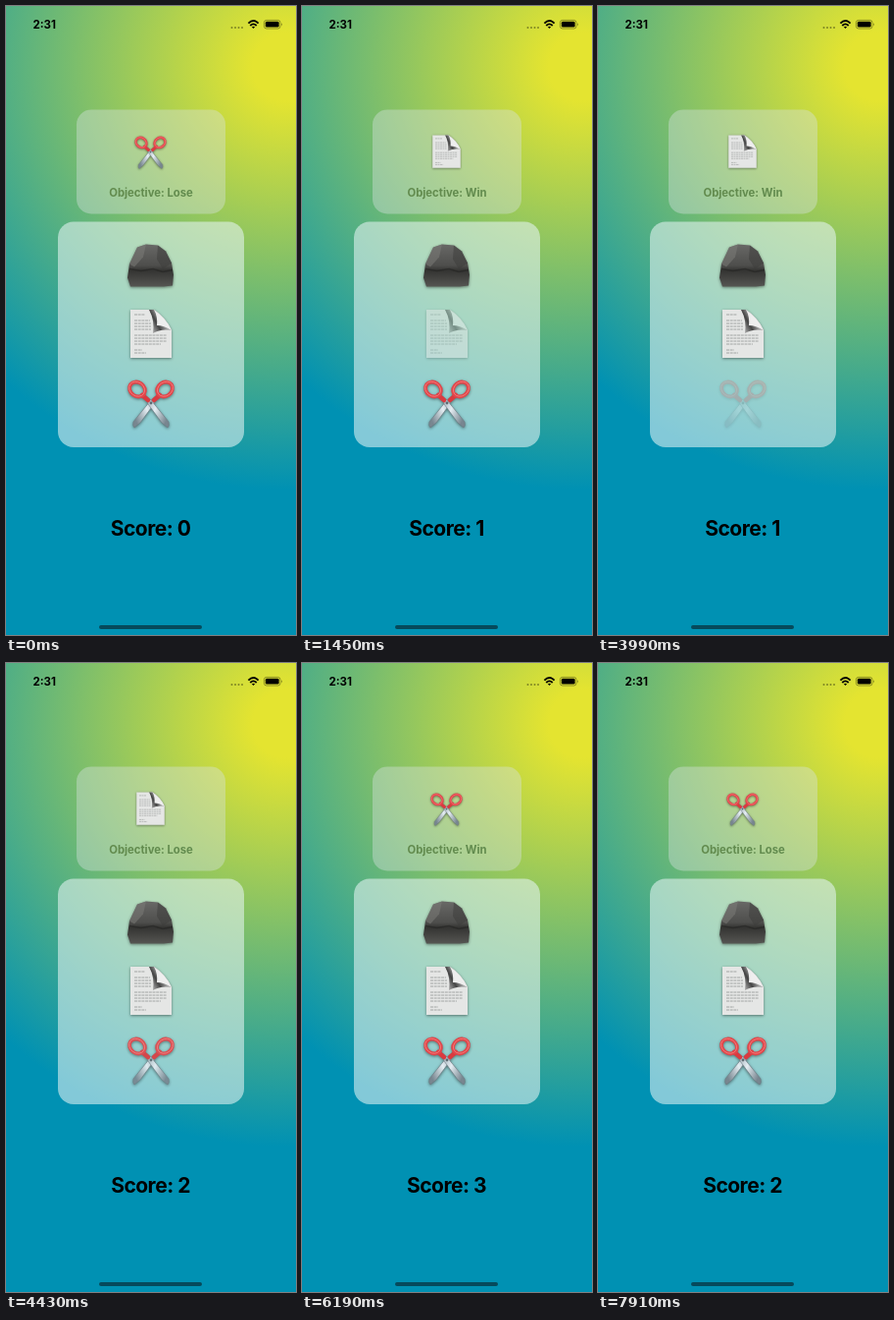
Recreate the animation shown at these times as an HTML page. Size 296x640 px, loop 8 s.

```html
<!DOCTYPE html>
<html lang="en">
<head>
<meta charset="utf-8">
<style>
  html, body { margin: 0; width: 100%; height: 100%; overflow: hidden; }
  svg { display: block; width: 100vw; height: 100vh; }
  text { font-family: Inter, Roboto, sans-serif; font-weight: 700; }
  .mid { text-anchor: middle; }
  .icon { filter: drop-shadow(0 1px 1.5px rgba(0, 0, 0, .45)); }
</style>
</head>
<body>
<svg viewBox="0 0 296 640">
  <defs>
    <radialGradient id="sky" gradientUnits="userSpaceOnUse" cx="286" cy="62" r="430">
      <stop offset=".08" stop-color="#e4e430"/>
      <stop offset="1" stop-color="#0091b3"/>
    </radialGradient>
    <linearGradient id="stone" x2="0" y2="1">
      <stop offset="0" stop-color="#686866"/>
      <stop offset=".5" stop-color="#4e4e4c"/>
      <stop offset=".62" stop-color="#343432"/>
      <stop offset="1" stop-color="#555552"/>
    </linearGradient>
    <linearGradient id="curl" x1="0" y1=".8" x2="1" y2=".2">
      <stop offset="0" stop-color="#bbb"/>
      <stop offset=".35" stop-color="#444"/>
      <stop offset=".6" stop-color="#aaa"/>
      <stop offset="1" stop-color="#f4f4f4"/>
    </linearGradient>
    <linearGradient id="steel" x2="1" y2=".6">
      <stop offset="0" stop-color="#8d9ca6"/>
      <stop offset=".5" stop-color="#e4edf2"/>
      <stop offset="1" stop-color="#788690"/>
    </linearGradient>

    <g id="rock">
      <path d="M-14-19L-5-22 7-21 15-15 21-3 23 9 22 20 13 21-21 21-24 12-22-2z" fill="url(#stone)"/>
      <path d="M-14-19L-5-22-8-9-17 1-22-2z" fill="#7d7d7a" opacity=".5"/>
      <path d="M7-21L15-15 21-3 12 3 6-7z" fill="#3c3c3a" opacity=".5"/>
      <path d="M-22 3L-10 5 2 3 12 6 22 4" fill="none" stroke="#242422" stroke-width="1.5" opacity=".6"/>
    </g>

    <g id="paper">
      <path d="M-21-25H3Q15-17 21-4V24H-21z" fill="#e5e6e5"/>
      <path d="M-17-20H-6M-17-14H-1M-17-11H0M-17-8H0M-17-5H0M-17 1H16M-17 4H16M-17 7H16M-17 10H10M-17 16H-9M-17 19H-5"
            stroke="#a2a5a4" stroke-width="1" stroke-dasharray="3 .7"/>
      <path d="M-2-25H3Q15-17 21-4Q10-6 2-1Q4-14-2-25z" fill="url(#curl)"/>
      <path d="M3-25Q7-18 6-9Q13-9 21-4Q15-17 3-25z" fill="#eee"/>
    </g>

    <g id="half">
      <path d="M-6-8L0-3 18 19Q19 23 17 25L11 20-3 1z" fill="url(#steel)" stroke="#6c7a82" stroke-width=".6"/>
      <path d="M-9-8L-3-3" stroke="#d93b40" stroke-width="4.5" stroke-linecap="round"/>
      <ellipse cx="-14" cy="-14" rx="7" ry="8.4" transform="rotate(-55 -14 -14)"
               fill="none" stroke="#e2454a" stroke-width="3.8"/>
      <ellipse cx="-14" cy="-14.5" rx="7" ry="8.4" transform="rotate(-55 -14 -14)"
               fill="none" stroke="#f58a86" stroke-width=".7"/>
    </g>
    <g id="scissors">
      <use href="#half" transform="scale(-1 1)"/>
      <use href="#half"/>
      <circle cy="0" r="1.4" fill="#5d6970"/>
    </g>
  </defs>

  <rect width="296" height="640" fill="url(#sky)"/>

  <text x="27.5" y="23" font-size="11.5" font-weight="600">2:31</text>
  <g fill="#000" fill-opacity=".4">
    <circle cx="230.5" cy="22" r="1"/><circle cx="234" cy="22" r="1"/>
    <circle cx="237.5" cy="22" r="1"/><circle cx="241" cy="22" r="1"/>
  </g>
  <g fill="none" stroke="#000" stroke-width="1.9">
    <path d="M247.4 17.6Q252.5 12.6 257.6 17.6M249.3 20Q252.5 16.8 255.7 20"/>
    <path d="M252.5 23L250.9 21.3Q252.5 20 254.1 21.3z" fill="#000" stroke="none"/>
    <rect x="263.4" y="14.4" width="16.6" height="8.6" rx="2.5" stroke-width=".8" stroke-opacity=".45"/>
    <rect x="264.8" y="15.8" width="13.8" height="5.8" rx="1.4" fill="#000" stroke="none"/>
    <path d="M281 17.2Q282.6 18.7 281 20.2z" fill="#000" fill-opacity=".5" stroke="none"/>
  </g>

  <rect x="72" y="105.5" width="152" height="106" rx="15" fill="rgb(215,225,225)" fill-opacity=".4"/>
  <use id="shown" class="icon" transform="translate(147.5 148.5) scale(.68)"/>
  <text id="goal" class="mid" x="148" y="193.5" font-size="11.3" fill="#628b4e"></text>

  <rect x="53" y="219.5" width="190" height="229.5" rx="16" fill="rgb(230,245,245)" fill-opacity=".57"/>
  <g id="buttons">
    <use class="icon" href="#rock" transform="translate(148 264.5)"/>
    <use class="icon" href="#paper" transform="translate(148 334)"/>
    <use class="icon" href="#scissors" transform="translate(148 404)"/>
  </g>

  <text id="score" class="mid" x="147.5" y="539" font-size="21" letter-spacing="-.5"></text>
  <rect x="95" y="630" width="105" height="4" rx="2" fill="#064a5c"/>
</svg>
<script>
const LOOP = 8000, STEP = 110, STEPS = 5;
const ROCK = 0, PAPER = 1, SCISSORS = 2;
const $ = id => document.getElementById(id);
const buttons = [...$('buttons').children];

const rounds = [
  ['scissors', 'Lose', 0], ['paper', 'Win', 1], ['paper', 'Lose', 2],
  ['scissors', 'Win', 3], ['scissors', 'Lose', 2]
];
const taps = [
  { at: 1240, button: PAPER, dim: .2 },
  { at: 3990, button: SCISSORS, dim: .22 },
  { at: 5630, button: ROCK, dim: .32 },
  { at: 7350, button: PAPER, dim: .2 }
];
const ease = u => u * u * (3 - 2 * u);

function draw(t) {
  let round = 0;
  const alpha = [1, 1, 1];
  for (const { at, button, dim } of taps) {
    if (t < at) break;
    // Press dims the button at once; release starts the next round and fades it back.
    const k = Math.min(STEPS, Math.floor((t - at + 10) / STEP));
    if (k > 0) round++;
    alpha[button] = dim + (1 - dim) * ease(k / STEPS);
  }
  const [hand, aim, points] = rounds[round];
  $('shown').setAttribute('href', '#' + hand);
  $('goal').textContent = 'Objective: ' + aim;
  $('score').textContent = 'Score: ' + points;
  buttons.forEach((b, i) => b.style.opacity = alpha[i]);
}

const start = performance.now();
function tick() {
  draw((performance.now() - start) % LOOP);
  requestAnimationFrame(tick);
}
tick();
</script>
</body>
</html>
```
